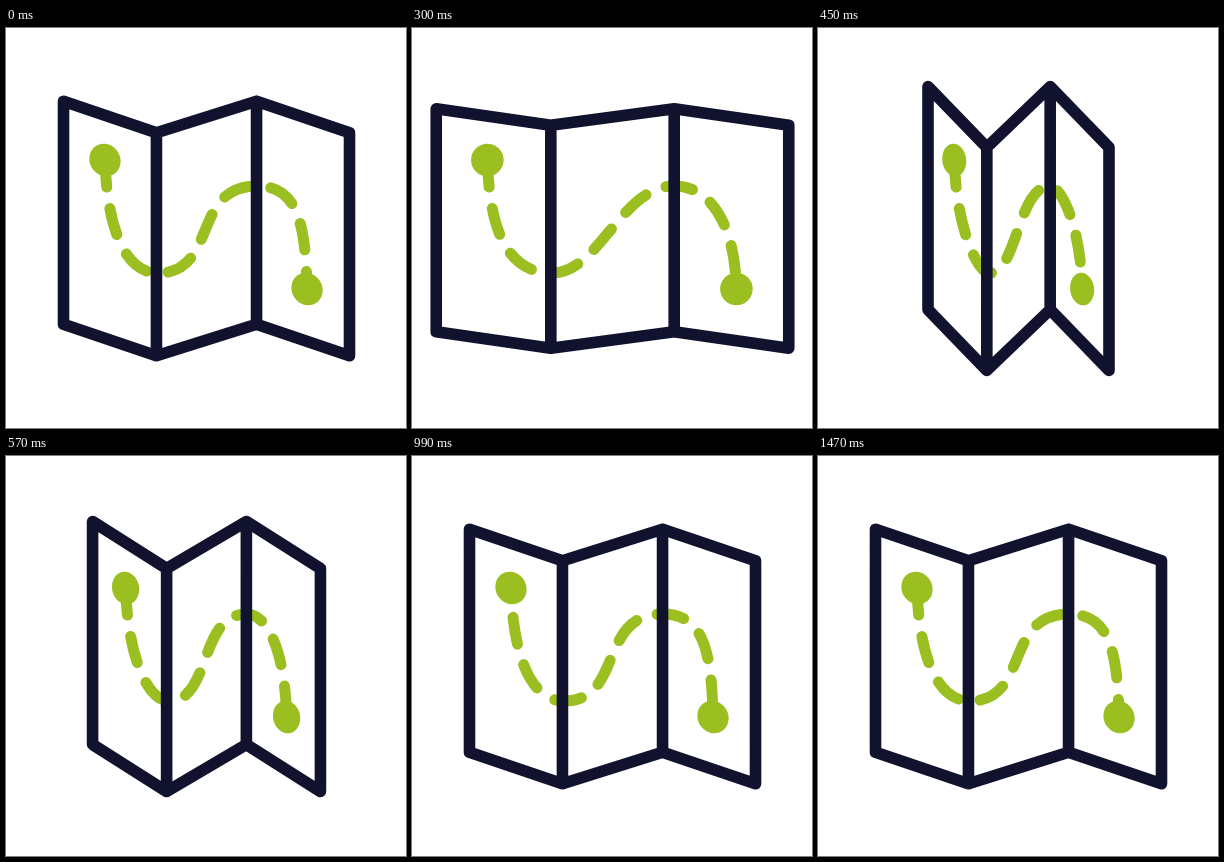
These frames come from a looping animation (400 by 400 pixels, 3530 ms). An HTML page:

```html
<!DOCTYPE html>
<html lang="en">
<head>
<meta charset="utf-8">
<title>Folding map</title>
<style>
  html, body { margin: 0; width: 100%; height: 100%; overflow: hidden; background: #fff; }
  svg { display: block; width: 100%; height: 100%; }
  path { fill: none; stroke-linecap: round; stroke-linejoin: round; }
  #route { stroke: #9bbe20; stroke-width: 11; stroke-dasharray: 27 21.7; }
  #map { stroke: #11122e; stroke-width: 11.6; }
  circle { fill: #9bbe20; }
</style>
</head>
<body>
<svg viewBox="0 0 400 400">
  <path id="route"/>
  <circle id="from" r="16.3"/>
  <circle id="to" r="16.3"/>
  <path id="map"/>
</svg>
<script>
const LOOP = 3530, STEP = 30, CENTER = 200.5, PERIOD = 48.7;
const FLOW_START = 570, FLOW_END = 1470;

// Half width of the map, then curve handles of the left, middle and right bend
const rest = [143, 33, 60, 41];
const poses = [
  [0, rest],
  [280, [178.5, 46, 49, 36]],
  [483, [84.5, 10, 26, 8]],
  [680, [156.5, 38, 67, 40]],
  [850, rest]
];

const el = id => document.getElementById(id);
const ease = p => (1 - Math.cos(Math.PI * p)) / 2;

function poseAt(t) {
  for (let i = 1; i < poses.length; i++) {
    const [t0, a] = poses[i - 1], [t1, b] = poses[i];
    if (t < t1) {
      const p = ease((t - t0) / (t1 - t0));
      return a.map((v, k) => v + (b[k] - v) * p);
    }
  }
  return rest;
}

// The narrower the map, the deeper its zigzag
function foldDepth(w) {
  const d = w - 90.5;
  return 30.4 - 0.2781 * d + 0.000594 * d * (w - 143);
}

function mapPath(w, depth) {
  const xs = [-1, -0.35, 0.35, 1].map(u => CENTER + u * w);
  const edge = y => xs.map((x, i) => [x, y + (i % 2 ? depth : -depth)]);
  const top = edge(89), bottom = edge(312);
  const outline = `M${top.join('L')}L${bottom.slice().reverse().join('L')}Z`;
  return outline + [1, 2].map(i => `M${top[i]}L${bottom[i]}`).join('');
}

// Start point, then three cubic segments through the low and the high turn
function routePoints([w, left, middle, right]) {
  const start = CENTER - 0.71 * w, end = CENTER + 0.703 * w;
  const low = CENTER + 5.1 - 0.375 * w, high = CENTER + 0.35 * w;
  return [
    [start, 132],
    [start + 2, 200], [low - left, 245], [low, 245],
    [low + middle, 245], [high - middle - 5, 158], [high, 158],
    [high + right, 158], [end - 1.5, 195], [end, 261]
  ];
}

function placeDot(id, [x, y], w, depth) {
  const squash = Math.min(1, 0.36 + 0.0042 * w);
  const skew = Math.min(0.08, Math.max(0, depth - 8) / 80);
  el(id).setAttribute('transform', `matrix(${squash} ${skew} 0 1 ${x} ${y})`);
}

function draw(t) {
  const pose = poseAt(t), w = pose[0], depth = foldDepth(w);
  const points = routePoints(pose);
  const flow = Math.min(1, Math.max(0, (t - FLOW_START) / (FLOW_END - FLOW_START)));

  el('map').setAttribute('d', mapPath(w, depth));
  el('route').setAttribute('d', `M${points[0]}C${points.slice(1).join(' ')}`);
  el('route').setAttribute('stroke-dashoffset', flow * 3 * PERIOD);
  placeDot('from', points[0], w, depth);
  placeDot('to', points[points.length - 1], w, depth);
}

const start = performance.now();
function tick() {
  const t = (performance.now() - start) % LOOP;
  draw(Math.floor(t / STEP) * STEP);
  requestAnimationFrame(tick);
}
tick();
</script>
</body>
</html>
```
